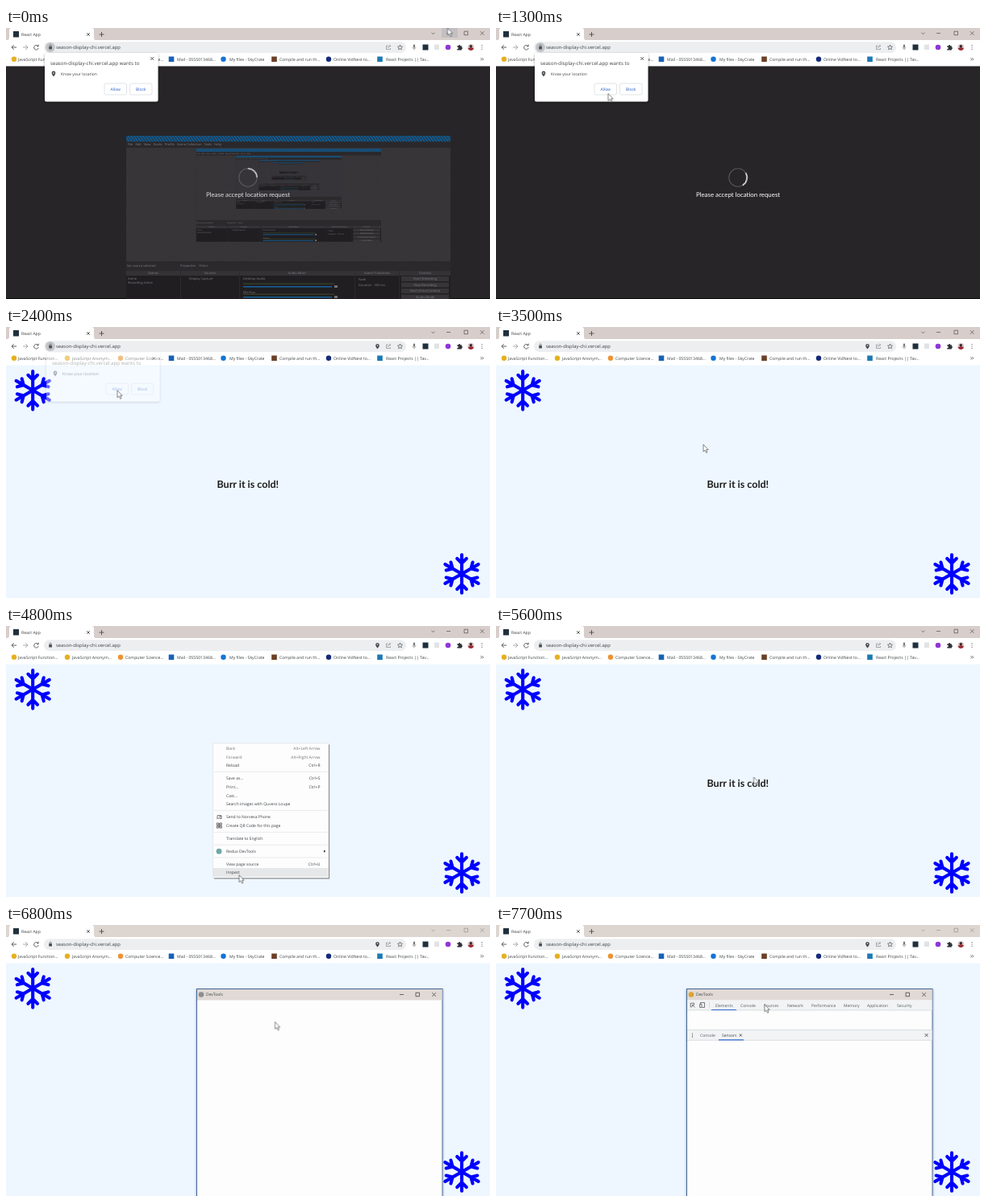
Recreate the animation shown at these times as an HTML page. Size 600 by 337 pixels, loop 8 s.

```html
<!DOCTYPE html>
<html lang="en">
<head>
<meta charset="utf-8">
<title>Season display</title>
<style>
html, body { margin: 0; width: 100%; height: 100%; overflow: hidden; background: #fff; }
svg { display: block; width: 100vw; height: 100vh; }
text { font: 5px "Open Sans", "Noto Sans", sans-serif; fill: #3c4043; text-rendering: geometricPrecision; white-space: pre; }
.line { fill: none; stroke: #444; stroke-width: .85; }
.lato { font-family: Lato, sans-serif; text-anchor: middle; }
.mid { text-anchor: middle; }
.end { text-anchor: end; }
.dim text { fill: #717478; }

/* One shared 8 s clock: 100 ms = 1.25 % */
.t { animation: 8s step-end infinite; }
#capture, #minHover { animation-name: capture; }
@keyframes capture { 0% { opacity: 1; } 1.25%, 100% { opacity: 0; } }
#loader { animation-name: loader; }
@keyframes loader { 0% { opacity: .84; } 1.25%, 100% { opacity: 1; } }
#arc { transform-origin: 300px 186px; animation: spin 8s steps(80) infinite; }
@keyframes spin { from { transform: rotate(44deg); } to { transform: rotate(4844deg); } }
#dark { animation-name: dark; }
@keyframes dark { 0% { opacity: 1; } 30%, 100% { opacity: 0; } }
#pin { animation-name: pin; }
@keyframes pin { 0% { opacity: 0; } 27.5%, 100% { opacity: 1; } }
#siteHover { animation-name: siteHover; }
@keyframes siteHover { 0% { opacity: 1; } 31.25%, 100% { opacity: 0; } }
#popup { animation-name: popup; }
@keyframes popup {
  0% { opacity: 1; transform: none; }
  28.75% { opacity: .93; transform: translate(.4px, .2px); }
  30% { opacity: .4; transform: translate(2px, 1px); }
  31.25%, 100% { opacity: 0; transform: translate(2px, 1px); }
}
#menu { animation-name: menu; }
@keyframes menu { 0% { opacity: 0; } 45% { opacity: 1; } 61.25%, 100% { opacity: 0; } }
#rowHover { animation-name: rowHover; }
@keyframes rowHover { 0% { opacity: 0; } 55%, 100% { opacity: 1; } }
#strip { animation-name: strip; }
@keyframes strip { 0% { fill: #d7cecb; } 80%, 100% { fill: #ddd5d0; } }
#controls { animation-name: controls; }
@keyframes controls { 0% { opacity: 1; } 80%, 100% { opacity: .5; } }
#tools { transform-origin: 388.5px 233px; animation-name: tools; }
@keyframes tools {
  0% { opacity: 0; transform: scale(.94); }
  80% { opacity: .25; transform: scale(.94); }
  81.25% { opacity: .58; transform: scale(.974); }
  82.5%, 100% { opacity: 1; transform: none; }
}
#toolsBar { animation-name: toolsBar; }
@keyframes toolsBar { 0% { fill: #eeeeee; } 82.5%, 100% { fill: #e0d9d5; } }
#toolsIcon { animation-name: toolsIcon; }
@keyframes toolsIcon { 0% { fill: #8b8e92; } 87.5%, 100% { fill: #dba333; } }
#panels { animation-name: panels; }
@keyframes panels { 0% { opacity: 0; } 87.5%, 100% { opacity: 1; } }
#cursor { animation: cursor 8s linear infinite; }
@keyframes cursor {
  0% { transform: translate(547.5px, 0); }
  2.5% { transform: translate(535px, 8px); }
  6.25% { transform: translate(355px, 55px); }
  10% { transform: translate(180px, 88px); }
  13.75%, 16.25% { transform: translate(139px, 81.5px); }
  21.25%, 32.5% { transform: translate(138px, 78.8px); }
  37.5%, 38.75% { transform: translate(215px, 130px); }
  43.75%, 46.25% { transform: translate(257px, 146px); }
  50% { transform: translate(272px, 220px); }
  53.75% { transform: translate(287px, 318px); }
  56.25%, 63.75% { transform: translate(289px, 309.6px); }
  68.75% { transform: translate(316px, 205px); }
  75%, 86.25% { transform: translate(333.5px, 120.4px); }
  91.25%, 100% { transform: translate(333px, 98.8px); }
}
</style>
</head>
<body>
<svg viewBox="0 0 600 337">
  <defs>
    <pattern id="hatch" width="3" height="3" patternUnits="userSpaceOnUse" patternTransform="rotate(45)">
      <path d="M0 0V3" stroke="#444345" stroke-width="1"/>
    </pattern>
    <pattern id="blueHatch" width="3" height="3" patternUnits="userSpaceOnUse" patternTransform="rotate(-35)">
      <rect width="3" height="3" fill="#0f6098"/><path d="M0 0V3" stroke="#25303a" stroke-width="1.8"/>
    </pattern>
    <clipPath id="preview"><rect x="149" y="149" width="402" height="141"/></clipPath>
    <filter id="shadow" x="-10%" y="-10%" width="120%" height="125%">
      <feDropShadow dx="0" dy="1" stdDeviation="1.6" flood-opacity=".38"/>
    </filter>
    <g id="flake" fill="none" stroke="#00f" stroke-width="4.1" stroke-linecap="round" stroke-linejoin="round"></g>
    <g id="recorder"></g>
  </defs>

  <!-- Cold page -->
  <rect y="47" width="600" height="290" fill="#eef7ff"/>
  <use href="#flake" x="33.2" y="78.8"/>
  <use href="#flake" x="565" y="307"/>
  <text class="lato" x="299.8" y="199.6" style="font-size:12.5px;font-weight:700;fill:#1c1c1e">Burr it is cold!</text>

  <!-- Waiting page -->
  <g id="dark" class="t">
    <rect y="47" width="600" height="290" fill="#272528"/>
    <rect y="336" width="600" height="1" fill="#0c0c0c"/>
    <g id="capture" class="t"></g>
    <g id="loader" class="t">
      <circle cx="300" cy="186" r="11.2" fill="none" stroke="#fff" stroke-opacity=".24" stroke-width="1.1"/>
      <path id="arc" d="M292.1 178.1A11.2 11.2 0 0 1 307.9 178.1" fill="none" stroke="#fff" stroke-width="1.4"/>
      <text class="lato" x="300" y="210.4" style="font-size:7.85px;fill:#fff">Please accept location request</text>
    </g>
  </g>

  <!-- Browser frame -->
  <rect id="strip" class="t" width="600" height="16"/>
  <rect y="15" width="600" height="32.5" fill="#fff"/>
  <path d="M2 15.5Q4 15 4 12V3Q4 0 7 0H106Q109 0 109 3V12Q109 15 111 15.5Z" fill="#fff"/>
  <rect x="9" y="4" width="7" height="7.5" fill="#20303c"/>
  <text x="19" y="9.8" style="font-size:5.1px">React App</text>
  <path class="line" d="M100.2 6.2l3.6 3.6m0-3.6l-3.6 3.6M115.5 8h6M118.5 5v6"/>
  <rect id="minHover" class="t" x="540" width="20" height="12" fill="#c3bfc2"/>
  <g id="controls" class="t"><path class="line" d="M527.5 5.7l2 2 2-2M546 6.5h5M568 4.2h4.5v4.5H568zM588 4.2l4.6 4.6m0-4.6l-4.6 4.6" style="stroke-width:.65"/></g>

  <path class="line" d="M13 24H7m2.8-2.8L7 24l2.8 2.8"/>
  <path class="line" d="M21 24h6m-2.8-2.8L27 24l-2.8 2.8" style="stroke:#999"/>
  <path class="line" d="M39.6 22.4A2.8 2.8 0 1 0 40.2 25M40.2 20.6v2.2H38"/>
  <rect x="47" y="17.3" width="449" height="13.6" rx="6.8" fill="#eceef0"/>
  <circle id="siteHover" class="t" cx="55" cy="24" r="6" fill="#c2c4c7"/>
  <rect x="53.2" y="23" width="3.8" height="3.4" rx=".4" fill="#4c5054"/>
  <path class="line" d="M54 23v-.8a1.1 1.1 0 0 1 2.2 0v.8" style="stroke-width:.6"/>
  <text x="62" y="26.1" style="font-size:5.88px">season-display-chi.vercel.app</text>
  <g id="pin" class="t"><path d="M460.5 27.4q-2.3-2.5-2.3-4.2a2.3 2.3 0 0 1 4.6 0q0 1.7-2.3 4.2z" fill="#44474a"/><circle cx="460.5" cy="23" r=".8" fill="#fff"/></g>
  <path class="line" d="M473.5 22h-2v4.5h5V25m-3.2 0q.2-2.6 3.2-2.8m-1.2-1.4l1.5 1.4-1.5 1.4" style="stroke:#777;stroke-width:.6"/>
  <path class="line" d="M488.5 21l.9 2 2.1.2-1.6 1.5.5 2.1-1.9-1.1-1.9 1.1.5-2.1-1.6-1.5 2.1-.2z" style="stroke-width:.65"/>
  <rect x="504.9" y="20.5" width="2.2" height="4.2" rx="1.1" fill="#777"/>
  <path class="line" d="M504 23.8a2 2 0 0 0 4 0M506 25.8v1.6" style="stroke:#777;stroke-width:.6"/>
  <rect x="516.5" y="20.5" width="7" height="7" fill="#20303c"/>
  <rect x="531" y="20.5" width="6" height="6.5" fill="#e2e3e5"/>
  <circle cx="548" cy="24" r="3.3" fill="#9036d8"/>
  <path d="M559.3 22.2h1.7a1.1 1.1 0 1 1 2.2 0h1.7v1.7a1.1 1.1 0 1 1 0 2.2v1.5h-5.6v-1.6a1.1 1.1 0 1 0 0-2.1z" fill="#303336"/>
  <circle cx="576.3" cy="24" r="4" fill="#d9c9c6"/>
  <path d="M572.6 25.6q3.7-3 7.4 0a4 4 0 0 1-7.4 0z" fill="#9b2732"/><circle cx="576.3" cy="22.6" r="1.7" fill="#33282a"/>
  <g fill="#555"><circle cx="590" cy="21.7" r=".6"/><circle cx="590" cy="24" r=".6"/><circle cx="590" cy="26.3" r=".6"/></g>
  <g id="bookmarks"></g>
  <path class="line" d="M588.3 37.2l1.6 1.6-1.6 1.6m2-3.2l1.6 1.6-1.6 1.6" style="stroke-width:.7"/>

  <!-- Permission popup -->
  <g id="popup" class="t">
    <rect x="48" y="31" width="140.5" height="60.5" rx="2" fill="#fff" filter="url(#shadow)"/>
    <text x="55" y="46.2" style="font-size:6.2px">season-display-chi.vercel.app wants to</text>
    <path class="line" d="M179.3 36l4 4m0-4l-4 4"/>
    <path d="M59 60.4q-2.4-2.6-2.4-4.4a2.4 2.4 0 0 1 4.8 0q0 1.8-2.4 4.4z" fill="#4b4e52"/><circle cx="59" cy="56" r=".8" fill="#fff"/>
    <text x="68" y="58.9">Know your location</text>
    <g fill="#fff" stroke="#d5d8dd" stroke-width=".7"><rect x="122" y="69" width="27.5" height="14" rx="2"/><rect x="153.5" y="69" width="27.5" height="14" rx="2"/></g>
    <text class="mid" x="135.7" y="77.8" style="fill:#2159c9">Allow</text>
    <text class="mid" x="167.2" y="77.8" style="fill:#2159c9">Block</text>
  </g>

  <!-- Context menu -->
  <g id="menu" class="t">
    <rect x="256.7" y="145.9" width="143.3" height="167.4" fill="#fdfdfe" stroke="#d4d6d8" stroke-width=".5"/>
    <path d="M258 313.9H400.6V147.5" fill="none" stroke="#8c8e91" stroke-width="1.1"/>
    <rect id="rowHover" class="t" x="257" y="301" width="142.8" height="11" fill="#e6e7e9"/>
    <path d="M257.5 181.2h142m-142 48.2h142m-142 27h142m-142 15.8h142m-142 15.8h142" stroke="#e4e6e8" stroke-width=".8"/>
    <g id="rows"></g>
    <path class="line" d="M262 238.6v-3h5M261 239.2h3M265 236.4h2.2v3H265z" style="stroke-width:.7"/>
    <path class="line" d="M261.2 245h2.2v2.2h-2.2zm4 0h2.2v2.2h-2.2zm-4 4h2.2v2.2h-2.2zm4 0h2.2v2.2h-2.2zM264.3 244.8v6.4M261 248.1h6.6" style="stroke-width:.7"/>
    <circle cx="264" cy="280.2" r="3.4" fill="#6fa7a6"/>
    <path d="M394 278.4l2.4 1.7-2.4 1.7z" fill="#333"/>
  </g>

  <!-- Developer tools window -->
  <g id="tools" class="t">
    <rect x="236.5" y="79.5" width="304.5" height="308" fill="#fdfdfe" stroke="#4a6899" stroke-width="1" filter="url(#shadow)"/>
    <rect id="toolsBar" class="t" x="237" y="80" width="303.5" height="13.5"/>
    <circle id="toolsIcon" class="t" cx="242" cy="86.5" r="3.3"/>
    <text x="248" y="88.3">DevTools</text>
    <path class="line" d="M488 86.5h5M508 84.2h4.5v4.5H508zM528.3 84.2l4.6 4.6m0-4.6l-4.6 4.6" style="stroke-width:.8"/>
    <g id="panels" class="t">
      <path d="M237 93.5h303.5V106H237zM237 130.5h303.5V143.3H237z" fill="#f1f3f4"/>
      <path d="M237 106h303.5M237 130.5h303.5M237 143.3h303.5M264.5 95.5v8" stroke="#cfd2d6" stroke-width=".7"/>
      <path class="line" d="M245.6 99v-1.8h-4.4v4.6h1.8M243.5 99.4l3 3m-3-1v-2h2M253.5 98v-1.5h5v6h-3M252.6 98.4h2.4v4h-2.4z" style="stroke-width:.7"/>
      <path d="M267 105.5h31M276 142.9h31" stroke="#2f6bd0" stroke-width="1.1"/>
      <g id="tabs"></g>
      <path class="line" d="M301.8 135.6l3 3m0-3l-3 3M531.6 135l4 4m0-4l-4 4"/>
      <g fill="#444"><circle cx="243.5" cy="135" r=".6"/><circle cx="243.5" cy="137.1" r=".6"/><circle cx="243.5" cy="139.2" r=".6"/></g>
    </g>
  </g>

  <path id="cursor" d="M0 0V9L2.1 7.2 3.6 10.4 5 9.8 3.6 6.6H6.2Z" fill="#fff" stroke="#444" stroke-width=".65"/>
</svg>
<script>
const fill = (id, parts) => { document.getElementById(id).innerHTML = parts.join(''); };
const label = (x, y, s, cls = '', style = '') => `<text x="${x}" y="${y}" class="${cls}" style="${style}">${s}</text>`;
const rect = (x, y, w, h, color) => `<rect x="${x}" y="${y}" width="${w}" height="${h}" fill="${color}"/>`;

fill('flake', [0, 60, 120, 180, 240, 300].map(a =>
  `<path transform="rotate(${a})" d="M0 0V-23.8M-5.8-19L0-13.2L5.8-19"/>`));

// Bookmarks: icon x, text x, label, colour, square icon
const bookmarks = [
  [10, 15, 'JavaScript Function...', '#e5b020'],
  [76, 82, 'JavaScript Anonym...', '#e5b020'],
  [142, 148, 'Computer Science...', '#ee9334'],
  [205, 212, 'Mail - 0555013468...', '#1762b5', true],
  [269.5, 277, 'My files - SkyCrate', '#1474d4'],
  [332.5, 339, 'Compile and run th...', '#6b4026', true],
  [400, 406, 'Online VidNest to...', '#142a7c'],
  [463.5, 471, 'React Projects || Tav...', '#1c79b5', true]
];
fill('bookmarks', bookmarks.map(([ix, x, s, color, square]) =>
  (square ? rect(ix - 3.3, 35.5, 6.6, 6.6, color) : `<circle cx="${ix}" cy="38.8" r="3.2" fill="${color}"/>`) +
  label(x, 40.6, s, '', 'font-size:5.15px')));

// Menu rows: centre y, label, shortcut
const rows = [
  [153, 'Back', 'Alt+Left Arrow'], [163.3, 'Forward', 'Alt+Right Arrow'], [174, 'Reload', 'Ctrl+R'],
  [189.7, 'Save as...', 'Ctrl+S'], [200.4, 'Print...', 'Ctrl+P'], [211.2, 'Cast...'],
  [221.8, 'Search images with Quvero Loupe'], [237.6, 'Send to Norvexa Phone'],
  [248.4, 'Create QR Code for this page'], [265, 'Translate to English'], [280.5, 'Redux DevTools'],
  [296.2, 'View page source', 'Ctrl+U'], [306.9, 'Inspect']
];
fill('rows', rows.map(([y, s, key = ''], i) =>
  `<g class="${i < 2 ? 'dim' : ''}">${label(273, y + 1.4, s)}${label(389.5, y + 1.4, key, 'end')}</g>`));

const tabs = [[272, 'Elements'], [303, 'Console'], [332, 'Sources'], [361, 'Network'], [391, 'Performance'],
  [431, 'Memory'], [460, 'Application'], [497, 'Security']];
fill('tabs', [...tabs.map(([x, s]) => label(x, 101.8, s, '', 'fill:#55595e')),
  label(253, 138.9, 'Console', '', 'fill:#55595e'), label(280, 138.9, 'Sensors')]);

// Recording window that shows itself, shrinking towards one point
const docks = [[149, 67, 'Scenes'], [217, 72, 'Sources'], [290, 142, 'Audio Mixer'], [433, 54, 'Scene Transitions'], [488, 63, 'Controls']];
const small = 'font-size:4px;fill:#87868a';
fill('recorder', [
  rect(149, 134, 402, 203, '#2b2a2c'), rect(149, 134, 402, 7.5, 'url(#blueHatch)'),
  rect(149, 141.5, 402, 7.5, '#2a292b'),
  label(151, 146.4, 'File   Edit   View   Docks   Profile   Scene Collection   Tools   Help', '', small),
  rect(149, 149, 402, 141, '#363537'), rect(149, 149, 402, 141, 'url(#hatch)'),
  label(150, 297.3, 'No source selected', '', small), label(216, 297.3, 'Properties    Filters', '', small),
  ...docks.map(([x, w, s]) => rect(x, 302, w, 35, '#1f1e20') + rect(x, 302, w, 6, '#353436') + label(x + w / 2, 306.4, s, 'mid', small)),
  label(151, 312.6, 'Scene', '', small), label(151, 318, 'Recording Scene', '', small),
  label(227, 312.6, 'Display Capture', '', small),
  label(294, 312.6, 'Desktop Audio', '', small), label(294, 330, 'Mic/Aux', '', small),
  ...[321, 334].map(y => rect(294, y - 3.5, 113, 1.2, '#3c4a2c') + rect(294, y, 110, 1.5, '#186ba8') + rect(407, y - 1, 4, 3, '#7c7b7e')),
  label(437, 314, 'Fade', '', small), label(437, 321, 'Duration   300 ms', '', small),
  ...['Start Streaming', 'Stop Recording', 'Start Virtual Camera', 'Studio Mode'].map((s, i) =>
    rect(490, 309 + i * 7.5, 59, 6, '#39383a') + label(519.5, 313.4 + i * 7.5, s, 'mid', small))
]);
const copies = [1, 2, 3, 4, 5].map(k =>
  `<use href="#recorder" transform="translate(351 171) scale(${0.57 ** k}) translate(-351 -171)"/>`);
fill('capture', ['<use href="#recorder"/>', `<g clip-path="url(#preview)">${copies.join('')}</g>`,
  rect(149, 134, 402, 203, 'rgba(39,37,40,.1)')]);
</script>
</body>
</html>
```
